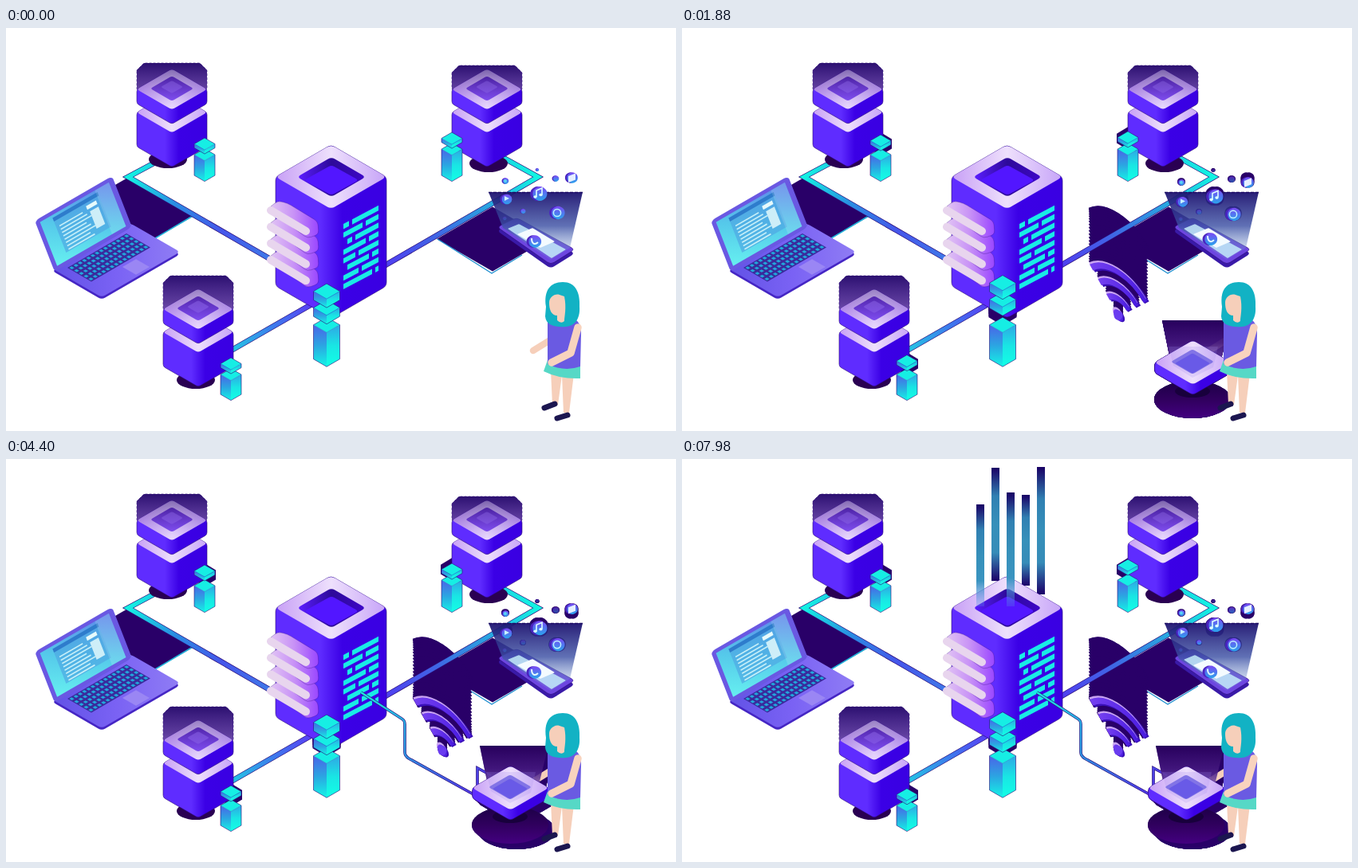
Animation of 840x506 px, one loop 8000 ms. Source, as an HTML page:

```html
<!DOCTYPE html>
<html lang="en">
<head>
<meta charset="utf-8">
<title>Isometric network</title>
<style>
html, body { margin: 0; width: 100%; height: 100%; overflow: hidden; background: #fff; }
svg { display: block; width: 100vw; height: 100vh; }
</style>
</head>
<body>
<svg id="stage" viewBox="0 0 840 506"></svg>
<script>
const LOOP = 8000, SLOPE = .58;
const DARK = '#290068', EDGE = '#2a0a78';
const stage = document.getElementById('stage');

// ---- drawing helpers ----
const shape = (d, fill, more = '') => `<path d="${d}" fill="${fill}" ${more}/>`;
const line = (d, stroke, w, more = '') => shape(d, 'none', `stroke="${stroke}" stroke-width="${w}" ${more}`);
const oval = (x, y, rx, ry, fill) => `<ellipse cx="${x}" cy="${y}" rx="${rx}" ry="${ry}" fill="${fill}"/>`;
const rect = (x, y, w, h, fill = 'inherit', more = '') =>
  `<rect x="${x}" y="${y}" width="${w}" height="${h}" fill="${fill}" ${more}/>`;
const group = (body, more = '') => `<g ${more}>${body}</g>`;
const at = (x, y, body) => group(body, `transform="translate(${x} ${y})"`);
const skew = (m, body, more = '') => group(body, `transform="matrix(${m})" ${more}`);
const repeat = (n, f) => Array.from({ length: n }, (_, i) => f(i)).join('');
const outline = w => `stroke="${EDGE}" stroke-width="${w}"`;

// polygon with softened corners
function poly(pts, r, fill, more) {
  const toward = (a, b) => {
    const k = Math.min(.5, r / Math.hypot(b[0] - a[0], b[1] - a[1]));
    return [a[0] + (b[0] - a[0]) * k, a[1] + (b[1] - a[1]) * k];
  };
  const n = pts.length;
  const d = pts.map((p, i) =>
    `${i ? 'L' : 'M'}${toward(p, pts[(i + n - 1) % n])}Q${p} ${toward(p, pts[(i + 1) % n])}`).join('');
  return shape(d + 'Z', fill, more);
}
// solid of half width w, half height h and depth d, centred on its top face
const hull = (x, y, w, h, d, r, fill, more) =>
  poly([[x - w, y], [x, y - h], [x + w, y], [x + w, y + d], [x, y + h + d], [x - w, y + d]], r, fill, more);
const diamond = (x, y, w, r, fill, h = w * SLOPE) =>
  poly([[x - w, y], [x, y - h], [x + w, y], [x, y + h]], r, fill);
const box = (x, y, w, d, r, h = w * SLOPE) =>
  hull(x, y, w, h, d, r, 'url(#body)', outline(.6)) + diamond(x, y, w, r + 1, 'url(#lilac)', h);
// floor tile from its left corner: a runs up right, b runs down right
const floor = (x, y, a, b, r, fill, more) => poly([[x, y], [x + a, y - a * SLOPE],
  [x + a + b, y + (b - a) * SLOPE], [x + b, y + b * SLOPE]], r, fill, more);

// gradient whose colours are spread evenly; a colour may carry an alpha as hex
const grad = (id, axis, ...colors) => {
  const [x1, y1, x2, y2] = axis;
  const user = axis.some(v => v > 1) ? 'gradientUnits="userSpaceOnUse"' : '';
  return `<linearGradient id="${id}" x1="${x1}" y1="${y1}" x2="${x2}" y2="${y2}" ${user}>` +
    colors.map((c, i) => `<stop offset="${i / (colors.length - 1)}" stop-color="${c}"/>`).join('') + '</linearGradient>';
};
const ACROSS = [0, 0, 1, 0], DOWN = [0, 0, 0, 1];
const defs = '<defs>' +
  grad('body', ACROSS, '#5f2cff', '#5f2cff', '#5f2cff', '#3b00e6', '#3a00e4', '#3a00e2') +
  grad('lilac', ACROSS, '#c9a2f6', '#eee0fc', '#c8a6f8') +
  grad('glass', DOWN, '#2c1070', '#54358f', '#9a7cc8') +
  grad('tint', DOWN, '#2c1070b0', '#6a45b060', '#a070ff10') +
  grad('inner', DOWN, '#4a18b8', '#7a48f0') +
  grad('pit', ACROSS, '#5a1cff', '#2d0a98', '#3d06c8') +
  grad('cyanL', DOWN, '#4a64e8', '#2ba6e2', '#14f4e6') +
  grad('cyanR', DOWN, '#2fa6e6', '#19e6e4', '#12ffe6') +
  grad('fin', ACROSS, '#e2c6f4', '#c892f6', '#9a46ff') +
  grad('beam', DOWN, '#190064', '#3080b2', '#3690ba', '#368cb8', '#1c0068') +
  grad('beamIn', DOWN, '#190064', '#3080b2', '#3690ba', '#3a94c0', '#5a8ce840') +
  grad('lineL', [152, 187, 330, 290], '#14f2e2', '#2a8ce2', '#4656ea', '#3f78e8') +
  grad('lineR', [477, 297, 668, 187], '#5040f0', '#3f66e4', '#2aa4e0', '#12f6e2') +
  grad('lineB', [284, 404, 385, 346], '#25c4e4', '#3c7cec', '#5a3cf4') +
  grad('wire', [445, 293, 590, 420], '#1de6e4', '#2f8fe0', '#5032e4') +
  grad('screen', [0, 1, 1, 0], '#66f0f0', '#55c8ea', '#5f84ea') +
  grad('base', ACROSS, '#6252e6', '#7a62f4', '#8f7cf4') +
  grad('holo', DOWN, '#1f1470f4', '#3c50a4d0', '#8fb0e020') +
  grad('haze', DOWN, '#27005c', '#42167cf0', '#7a58b8b0') +
  grad('pool', DOWN, '#1c0046', '#30005e', '#430080') +
  grad('icon', DOWN, '#7a48f4', '#2aa4ec') +
  grad('wave', ACROSS, '#7440f0', '#4a1ce0') + '</defs>';

// ---- motion ----
const ramp = (t, from, to) => Math.max(0, Math.min(1, (t - from) / (to - from)));
const ease = k => k * k * (3 - 2 * k);
const wave = (t, period) => (1 - Math.cos(2 * Math.PI * t / period)) / 2;
const bob = (amp, period) => t => [0, amp * wave(t, period)];

const movers = [], trails = [];
let trailMarkup = '';

// A moving group that leaves its dark print behind
function mover(body, print, pos, { from = 0, to = 2400, n = 8, alpha = () => 1 } = {}) {
  const id = 'm' + movers.length;
  movers.push({ id, pos, alpha });
  for (let i = 0; i < n; i++) {
    const born = from + (to - from) * i / (n - 1), mark = 't' + trails.length;
    trailMarkup += group(print, `id="${mark}" transform="translate(${pos(born)})"`);
    trails.push({ id: mark, born: Math.max(born, 20) });
  }
  return group(body, `id="${id}"`);
}

// ---- parts ----
function node(x, y, lid, shadowX, shadowY) {
  const glass = [[-44, lid + 9], [-35, lid], [35, lid], [44, lid + 9], [44, 77], [0, 102], [-44, 77]];
  return oval(shadowX, shadowY, 24, 11, '#2a0052') + at(x, y,
    box(0, 106, 44, 43, 3) +
    poly(glass, 1, 'url(#glass)', outline(.6) + ' stroke-dasharray="3 2"') +
    box(0, 77, 44, 18, 3) + diamond(0, 76, 27, 3, 'url(#inner)') + diamond(0, 74, 14, 2, '#7d50e8') +
    poly(glass, 1, 'url(#tint)'));
}

function cube(x, y, w, d) {
  const h = w * SLOPE;
  return poly([[x - w, y], [x, y + h], [x, y + h + d], [x - w, y + d]], 0, 'url(#cyanL)') +
    poly([[x + w, y], [x, y + h], [x, y + h + d], [x + w, y + d]], 0, 'url(#cyanR)') +
    diamond(x, y, w, 0, '#16eee4') + hull(x, y, w, h, d, 0, 'none', outline(.6)) +
    line(`M${x - w} ${y}l${w} ${h}l${w} ${-h}`, '#1c7cc8', .6);
}
// base column with a stack of floating cubes
function post(x, y, w, depth, cubes, d, amp, period) {
  const step = w * SLOPE + d, top = y + w * SLOPE;
  const stack = draw => Array.from({ length: cubes }, (_, i) => draw(top + i * step)).reverse().join('');
  return cube(x, top + cubes * step + 1, w, depth) +
    mover(stack(cy => cube(x, cy, w, d)), stack(cy => hull(x, cy, w + 1, w * SLOPE + 1, d + 1, 0, DARK)),
      bob(amp, period), { n: 6 });
}

// each row is a run of bricks broken by one gap that shifts from row to row
const bricks = () => skew([1, -.53, 0, 1, 423, 246], repeat(8, i => {
  const gap = 7 + i * 17 % 30, from = i % 3 === 2 ? 5 : 0;
  return rect(from, i * 10.8, gap - from, 6.5) + rect(gap + 4, i * 10.8, 40 - gap, 6.5);
}), 'fill="#19ebe6"');

const fins = () => repeat(4, i => at(0, (3 - i) * 20.7,
  poly([[328, 227], [341, 217], [353, 220], [391, 243], [392, 259], [378, 264]], 5, 'url(#fin)', outline(.3)) +
  line('M332 229l44 26', '#e8d5ee', 10, 'stroke-linecap="round"')));

const building = () => box(407.5, 187, 69.5, 137, 5) +
  diamond(408, 187, 43, 5, 'url(#pit)') + poly([[374, 191], [408, 172], [442, 191], [408, 210]], 4, '#5216ff') +
  bricks() + fins();

function laptop() {
  const keys = repeat(70, i => rect(i % 14 / 14 + .015, Math.floor(i / 14) / 5 + .04, .042, .11));
  const text = repeat(8, i => rect(.24, .3 + i * .065, .3 + i % 3 * .04, .024));
  return floor(58, 305, 98, 62, 5, '#4526c4') + floor(58, 302, 98, 62, 5, 'url(#base)') +
    floor(77, 301, 74, 30, 0, '#3a2a9c') +
    skew([74, -43, 30, 17.4, 77, 301], keys, 'fill="#22a8dc"') +
    floor(146, 300, 17, 17, 0, '#9a86f4') +
    skew([97, -56, 25, 64, 36, 242],
      rect(0, 0, 1, 1, '#6a58e2', 'rx=".06"') + rect(.05, .07, .89, .86, 'url(#screen)') +
      rect(.2, .12, .58, .68, '#4fa8e4', 'opacity=".7"') + rect(.2, .12, .58, .07, '#2e7ccc') +
      group(text, 'fill="#c8f0f8"') + rect(.62, .36, .11, .34, '#cdeef8') + rect(.6, .24, .13, .07, '#e6fafc') +
      rect(.76, .07, .18, .86, '#fff', 'opacity=".14"'));
}

function phone() {
  const slab = y => [[616, 250 + y], [640, 238], [713, 278 + y], [683, 297 + y]];
  return poly(slab(5), 5, '#3a1aa8') + poly(slab(0), 5, '#6d46e0', outline(.6)) +
    poly([[605, 206], [723, 206], [707, 276], [683, 291], [623, 251]], 0, 'url(#holo)') +
    line('M605 206.5h118', '#1c0a64', 1.4, 'stroke-dasharray="4 2"') +
    poly([[629, 252], [643, 246], [702, 278], [684, 289]], 1, '#c4ecfa', 'opacity=".85"') +
    poly([[641, 259], [660, 251], [688, 268], [670, 276]], 1, '#f4fbff');
}

function icon(x, y, s, glyph = '', amp = 1, alpha) {
  const tile = (dx, fill) => at(x + dx, y, hull(0, -s * .4, s * .75, s * .45, s * .8, s * .4, fill));
  return mover(tile(-s * .15, '#4a24c0') + tile(s * .12, 'url(#icon)') + at(x, y, glyph),
    tile(-s * .2, DARK) + tile(s * .2, DARK), bob(amp, 2600 + x * 37 % 1900), { n: 5, alpha });
}
const fade = period => t => 1 - .75 * wave(t, period);
const icons = () =>
  icon(668, 208, 12, line('M-3 4v-8l7 -3v8', '#dff', 1.6) + oval(-4.5, 4, 2.2, 1.8, '#dff') + oval(2.5, 1.5, 2.2, 1.8, '#dff'), 6) +
  icon(691, 232, 11, '<circle r="4.6" fill="none" stroke="#bff4ff" stroke-width="1.5"/>', 2) +
  icon(627, 215, 8.5, shape('M-2 -4l6 3l-6 3Z', '#c8f4ff'), 4) +
  icon(662, 268, 10.5, line('M-3 -4C-3 3 1 5 5 1', '#e4fbff', 2), -3) +
  icon(709, 188, 9, floor(-4, 1, 9, 0, 0, 'none') + skew([1, -.4, 0, 1, -4, -2], rect(0, 0, 9, 8, '#e6f0ff')), 6) +
  icon(626, 192, 5, oval(0, 0, 2, 2, '#5ad4f4'), 2) +
  icon(689, 189, 5, '', 1, fade(6400)) + icon(666, 178, 2.6, '', 1, fade(3200)) +
  icon(648, 230, 4, '', 1, fade(2700)) + icon(625, 239, 3, '', 1, () => .3);

function wifi() {
  const arcs = (color, w) => skew([.88, .56, 0, 1, 547, 366],
    [55, 38, 21].map(r => line(`M${-r * .7} ${-r * .7}A${r} ${r} 0 0 1 ${r * .7} ${-r * .7}`, color, w)).join('') +
    oval(0, 0, 7, 6.5, color));
  const drop = t => [0, -74 + 74 * ease(ramp(t, 500, 2150)) + 2 * Math.sin(ramp(t, 2150, 4200) * Math.PI)];
  return mover(at(2, 1, arcs('#3a10b8', 9)) + at(-1, -3, arcs('#c9a4f2', 6)) + arcs('url(#wave)', 7) + oval(547, 366, 5.5, 6, '#6a3cf0'),
    arcs(DARK, 11), drop, { from: 500, to: 2200, n: 28, alpha: t => .2 * ramp(t, 500, 1150) + .8 * ramp(t, 1150, 1850) });
}

const SKIN = '#f6cfba', SHOE = '#1c1650', ROUND = 'stroke-linecap="round" stroke-linejoin="round"';
const girlBack = line('M682 392L661 405', SKIN, 8.5, ROUND);
const girl =
  shape('M683 430l2 43h7l5 -37l2 47h7l6 -49Z', SKIN) +
  ['M675 477l13 -5', 'M691 490l13 -4'].map(d => line(d, SHOE, 7, ROUND)).join('') +
  shape('M680 414h40v26Q694 441 674 431Z', '#56d8c6') +
  shape('M679 368Q690 358 714 366Q722 372 721 384L720 425Q700 432 679 422Z', '#6a5ae2') +
  shape('M677 350C674 330 682 319 698 319S720 332 719 350C720 364 714 374 702 375S677 374 676 362Z', '#12b2c4') +
  shape('M681 345C681 338 688 333 694 335L700 337C703 352 700 362 700 368Q696 372 691 367V361C684 361 681 354 681 345Z', SKIN) +
  line('M717 376L708 408L684 420', '#f8d3be', 9.5, ROUND);

function table() {
  const pos = t => [-8, -7].map(v => v * ease(ramp(t, 1900, 3000)));
  const pool = fill => oval(640, 466.5, 48, 23.5, fill);
  const haze = [[602, 367], [688, 367], [674, 424], [612, 416]];
  return mover(
    pool('url(#pool)') + oval(640, 456, 22, 8, '#18003c') + poly(haze, 0, 'url(#haze)') +
    box(640.5, 420, 48, 13, 4) + diamond(640, 419, 27, 3, '#7c70e4') + diamond(640, 421, 22, 2, '#5c50e6') +
    poly([[610, 400], [672, 400], [666, 426], [640, 439], [616, 424]], 0, '#9a80e8', 'opacity=".2"'),
    pool(DARK) + hull(640.5, 420, 48, 28, 13, 4, DARK) + poly(haze, 0, DARK, 'opacity=".8"'),
    pos, { from: 250, to: 3000, n: 9, alpha: t => ramp(t, 300, 850) });
}

// Even beams end on the pit floor, the others behind the roof edge
const beams = [57, 11, 42, 45, 10].map((top, i) => {
  const x = 369 + 19 * i, inside = i === 0 || i === 2;
  return { x, top, inside, bottom: inside ? 185 : 145 + Math.abs(x - 402) * SLOPE, start: 4450 + 175 * i };
});
const drawBeams = inside => beams.map((b, i) => b.inside !== inside ? '' : group(
  (inside ? '' : rect(b.x, 0, 10, 0, '#1a0068', 'rx="2"')) +
  rect(b.x, 0, 10, 0, `url(#${inside ? 'beamIn' : 'beam'})`), `id="b${i}"`)).join('');

const road = (d, id) => line(d, EDGE, 7) + line(d, `url(#${id})`, 5.6);
const wire = (name, d) => [[EDGE, 3.6], ['url(#wire)', 2.4]].map(([color, w]) =>
  line(d, color, w, `class="${name}" pathLength="1" stroke-dasharray="1 2"`)).join('');

// ---- scene ----
const pads = floor(104, 216, 48, 83, 0, DARK) + line('M187 264l47 -28', '#22b8dc', 1.5) +
  floor(540, 265, 70, 70, 0, DARK) + line('M541 265l68 43l38 -23', '#2090d0', 1.4);

const front =
  wifi() +
  road('M198 163L153 187L345 298', 'lineL') + road('M620 161L667 187L470 301', 'lineR') + road('M275 409L390 343', 'lineB') +
  node(208, 0, 44, 203, 165) + post(249, 138, 13, 26, 1, 5, -6, 2700) +
  node(603, 0, 47, 605, 170) + post(559, 131, 13, 33, 1, 5, -6, 2200) +
  node(241, 276, 35, 238, 442) + post(282, 414, 13, 25, 1, 5, -6, 2600) +
  drawBeams(false) + building() + drawBeams(true) +
  post(402, 321, 16.5, 43, 2, 11, -11, 4400) +
  laptop() + phone() + icons() +
  wire('wireA', 'M445 293L496 326Q500 328 500 333V368Q500 373 505 376L586 421') +
  girlBack + wire('wireB', 'M591 410V388L608 397') + table() + girl;

stage.innerHTML = defs + pads + group(trailMarkup) + front;

for (const part of [...movers, ...trails]) part.el = document.getElementById(part.id);
beams.forEach((b, i) => b.els = [...document.getElementById('b' + i).children]);
const wires = [['.wireA', 3350, 4050], ['.wireB', 4000, 4300]]
  .map(([name, from, to]) => ({ els: stage.querySelectorAll(name), from, to }));

function draw(t) {
  for (const m of movers) {
    m.el.setAttribute('transform', `translate(${m.pos(t)})`);
    m.el.setAttribute('opacity', m.alpha(t));
  }
  for (const p of trails) p.el.setAttribute('visibility', t >= p.born ? 'visible' : 'hidden');
  for (const { els, top, bottom, start } of beams) {
    const h = (bottom - top) * ease(ramp(t, start, start + 700));
    for (const el of els) {
      el.setAttribute('y', bottom - h);
      el.setAttribute('height', h);
    }
    els.at(-1).setAttribute('opacity', ramp(t, start + 400, start + 850));
  }
  for (const { els, from, to } of wires) {
    const k = ramp(t, from, to);
    for (const el of els) {
      el.setAttribute('stroke-dashoffset', 1 - k);
      el.setAttribute('visibility', k ? 'visible' : 'hidden');
    }
  }
}

const begin = performance.now();
function tick() {
  draw((performance.now() - begin) % LOOP);
  requestAnimationFrame(tick);
}
tick();
</script>
</body>
</html>
```
